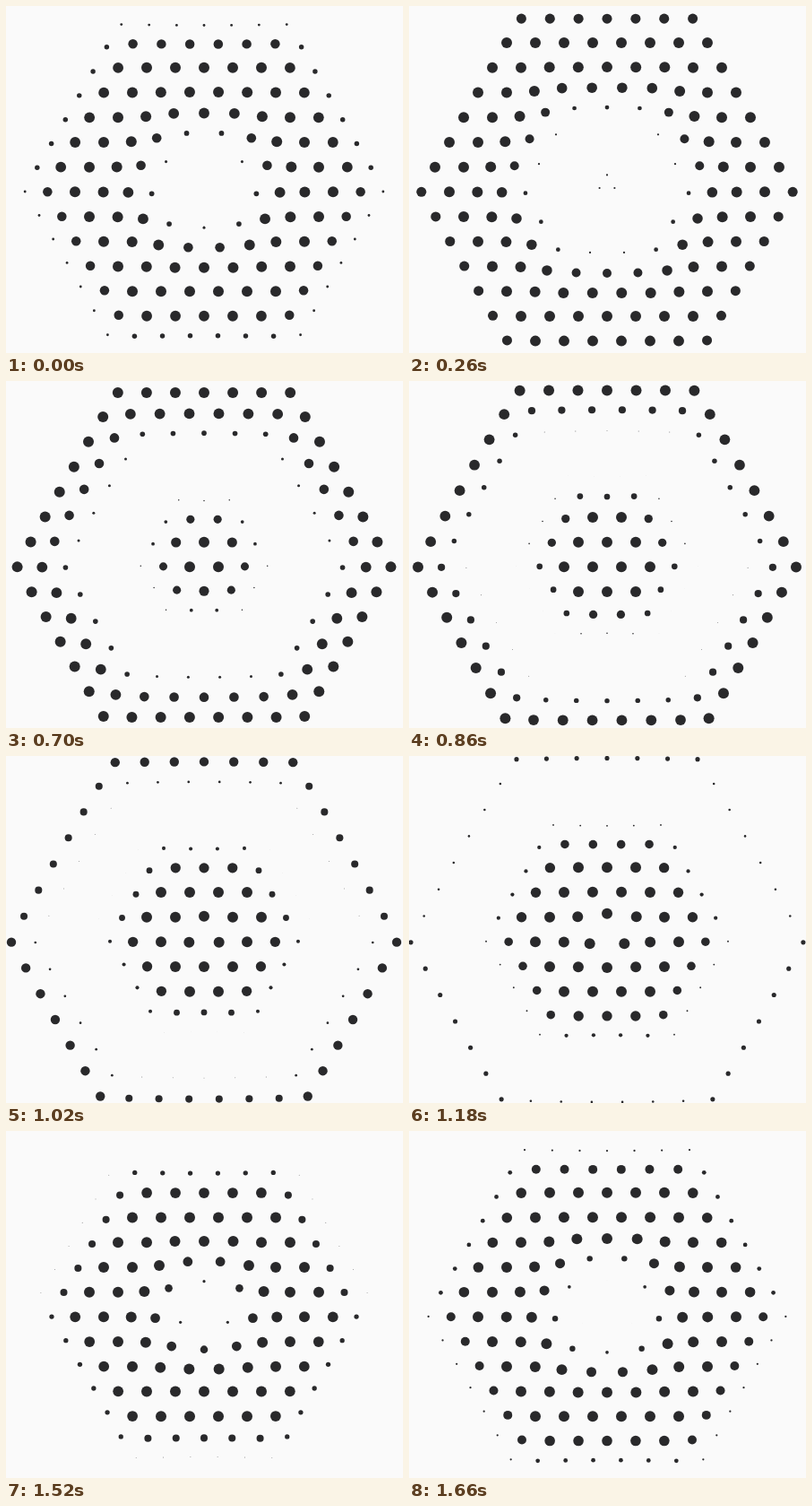
An HTML page with a canvas for the animation above (1680 ms loop, 443 by 387 pixels).

```html
<!DOCTYPE html>
<html lang="en">
<head>
<meta charset="utf-8">
<title>Hexagonal dot wave</title>
<style>
  html, body { margin: 0; width: 100%; height: 100%; overflow: hidden; background: #fafafa; }
  canvas { display: block; }
</style>
</head>
<body>
<canvas id="stage" width="443" height="387"></canvas>
<script>
const ctx = document.getElementById('stage').getContext('2d');
const LOOP = 1680, GAP = 32, ROW = GAP * Math.sqrt(3) / 2, RADIUS = 6;
const CX = 221, CY = 193.5 + ROW / 6;
const DELAY = 8.4; // ms per pixel of hexagonal distance

const mod = (a, b) => ((a % b) + b) % b;

// Sine ease from 0 to 1, starting at `start` and lasting `length`
function ease(time, start, length) {
  const p = Math.min(1, Math.max(0, (time - start) / length));
  return (1 - Math.cos(Math.PI * p)) / 2;
}

const dots = [];
for (let row = -7; row <= 6; row++) {
  const count = 14 - Math.abs(row);
  for (let i = 0; i < count; i++) {
    const x = (i - (count - 1) / 2) * GAP;
    const y = row * ROW + ROW / 3;
    const hex = Math.max(Math.abs(y), Math.abs(x) * Math.sqrt(3) / 2 + Math.abs(y) / 2);
    dots.push({ x, y, hex, dist: Math.hypot(x, y) });
  }
}

function draw(time) {
  ctx.fillStyle = '#fafafa';
  ctx.fillRect(0, 0, 443, 387);
  ctx.fillStyle = '#29292b';
  for (const { x, y, hex, dist } of dots) {
    const local = mod(time - DELAY * hex + 60, LOOP) - 60;
    const grow = ease(local, -40, 523);
    const shrink = ease(local, 1023, 524);
    const push = 10.7 * (grow - 1) + 13.5 * ease(local, 740, 800);
    const scale = 1 + push / dist;
    ctx.beginPath();
    ctx.arc(CX + x * scale, CY + y * scale, RADIUS * grow * (1 - shrink), 0, 2 * Math.PI);
    ctx.fill();
  }
}

const start = performance.now();
function tick() {
  draw((performance.now() - start) % LOOP);
  requestAnimationFrame(tick);
}
tick();
</script>
</body>
</html>
```
